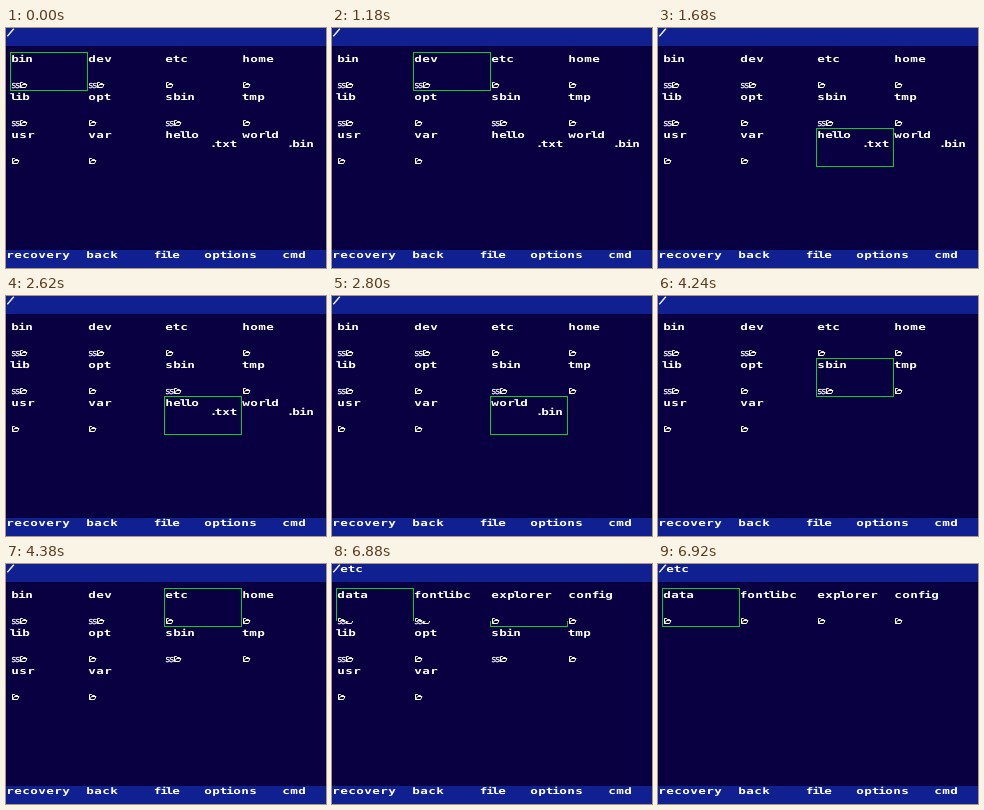
Recreate the animation shown at these times as an HTML page. Size 320 by 240 pixels, loop 8000 ms.

```html
<!DOCTYPE html>
<html lang="en">
<head>
<meta charset="utf-8">
<title>File explorer</title>
<style>
  html, body { margin: 0; width: 100%; height: 100%; overflow: hidden; background: #080040; }
  svg { display: block; width: 100vw; height: 100vh; }
  text {
    font: bold 9px "DejaVu Sans Mono", monospace;
    fill: #fff;
    text-anchor: middle;
    text-rendering: geometricPrecision;
  }
  .slash { font: 11px "DejaVu Sans", sans-serif; text-anchor: start; stroke: #fff; stroke-width: .5; }
  .flags {
    font: 9px "DejaVu Sans", sans-serif;
    letter-spacing: -.6px;
    text-anchor: start;
    stroke: #fff;
    stroke-width: .25;
  }
  .folder { fill: none; stroke: #fff; }
  .cursor { fill: none; stroke: #08cc30; }
</style>
</head>
<body>
<svg id="stage" viewBox="0 0 320 240" shape-rendering="crispEdges"></svg>
<script>
const LOOP = 8000;
const CELL = { x: 4, y: 24, w: 77, h: 38, cols: 4 };
const TEAR_Y = 57;
const BAR = "#102090";
const WIDE = 1.4; // aspect of the wide, low typeface
const stage = document.getElementById("stage");

const ROOT = ["bin", "dev", "etc", "home", "lib", "opt", "sbin", "tmp", "usr", "var"];
const ETC = ["data", "fontlibc", "explorer", "config"];
const FLAGGED = new Set(["bin", "dev", "lib", "sbin"]);
const MENU = [["recovery", 0], ["back", 80], ["file", 148], ["options", 198], ["cmd", 276]];

// [start time, selected cell]
const MOVES = [[0, 0], [1180, 1], [1360, 2], [1590, 6], [1680, 10], [4240, 6], [4380, 2]];

// Proportional advances; every other glyph takes 8 px.
const ADVANCE = { ".": 3, l: 5, i: 6, t: 7, f: 7 };

function label(str, x, baseline) {
  const centres = [...str].map(c => {
    const w = ADVANCE[c] || 8;
    x += w;
    return ((x - w / 2) / WIDE).toFixed(2);
  });
  return `<text transform="scale(${WIDE} 1)" x="${centres.join(" ")}" y="${baseline}">${str}</text>`;
}

function rect(x, y, w, h, fill) {
  return `<rect x="${x}" y="${y}" width="${w}" height="${h}" fill="${fill}"/>`;
}

function folder(x, y) {
  return `<path class="folder" shape-rendering="auto" transform="translate(${x} ${y})"
    d="M.5 5.5V.5H2.5L3.5 1.5H5.5V2.5M.5 5.5L2.5 2.5H7L5.5 5.5Z"/>`;
}

function cellAt(i) {
  return {
    x: CELL.x + (i % CELL.cols) * CELL.w,
    y: CELL.y + Math.floor(i / CELL.cols) * CELL.h
  };
}

function entry(name, i) {
  const { x, y } = cellAt(i);
  const [base, ext] = name.split(".");
  const title = label(base, x + 1, y + 10);
  if (ext) return title + label("." + ext, x + 48, y + 19);
  if (!FLAGGED.has(name)) return title + folder(x + 2, y + 30);
  return title + `<text class="flags" x="${x + 1.5}" y="${y + 36}">ss</text>` + folder(x + 10, y + 30);
}

function cursor(i) {
  const { x, y } = cellAt(i);
  return `<rect class="cursor" x="${x + .5}" y="${y + .5}" width="${CELL.w}" height="${CELL.h}"/>`;
}

function screen(path, names, selected) {
  return rect(0, 0, 320, 240, "#080040") + rect(0, 0, 320, 18, BAR) + rect(0, 222, 320, 18, BAR) +
    `<text class="slash" transform="translate(1.4 7.1) rotate(23)">/</text>` +
    (path ? label(path, 8, 8) : "") +
    MENU.map(([str, x]) => label(str, x, 230)).join("") +
    names.map(entry).join("") + cursor(selected);
}

function rootScreen(t) {
  const files = t < 2800 ? ["hello.txt", "world.bin"] : t < 3350 ? ["world.bin"] : [];
  const selected = MOVES.filter(([start]) => start <= t).pop()[1];
  return screen("", ROOT.concat(files), selected);
}

function picture(t) {
  if (t < 6880) return rootScreen(t);
  const next = screen("etc", ETC, 0);
  if (t >= 6920) return next;
  // The new folder is only partly drawn: the lower part is still the old screen.
  return rootScreen(t) +
    `<clipPath id="drawn">${rect(0, 0, 320, TEAR_Y, "#fff")}</clipPath>` +
    `<g clip-path="url(#drawn)">${next}</g>`;
}

let shown = "";
function render(now) {
  const markup = picture(now % LOOP);
  if (markup !== shown) stage.innerHTML = shown = markup;
  requestAnimationFrame(render);
}
render(0);
</script>
</body>
</html>
```
